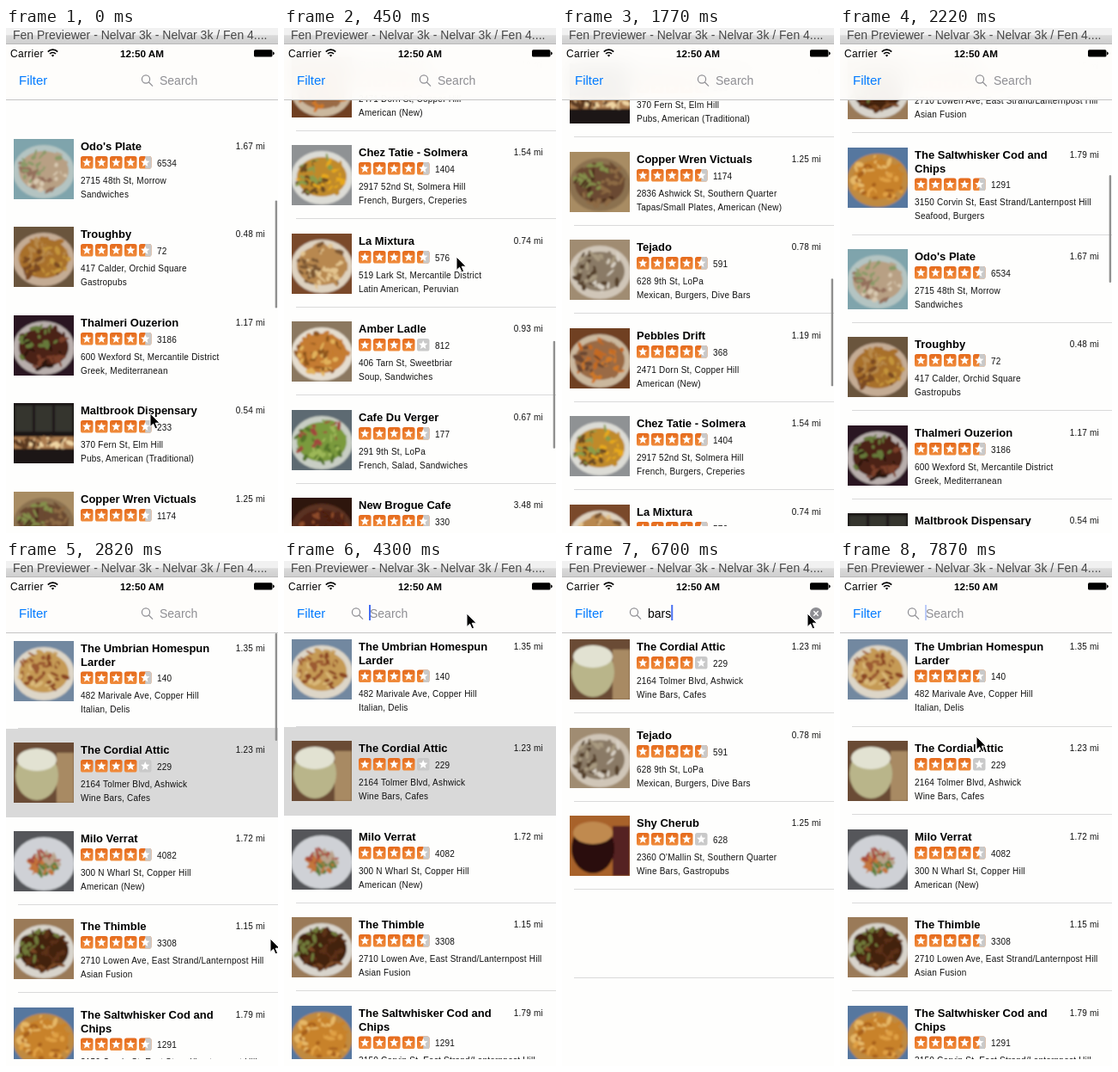
Animation, 317 px wide and 587 px high, one loop 8 s. Source, as an HTML page:

```html
<!DOCTYPE html>
<html lang="en">
<head>
<meta charset="utf-8">
<title>Restaurant list</title>
<style>
html, body { margin: 0; width: 100%; height: 100%; overflow: hidden; background: #fefefd; }
#stage { position: relative; width: 317px; height: 587px; overflow: hidden; }
#stage > svg, #nav { position: absolute; left: 0; top: 0; }
#nav { top: 19px; width: 317px; height: 65px; box-sizing: border-box; border-bottom: 1px solid #c4c4c4;
  background: rgba(254, 253, 251, .95); backdrop-filter: blur(12px); }
text { font-family: "Liberation Sans", Arial, sans-serif; white-space: pre; }
.name { font-size: 13px; font-weight: bold; }
.info { font-size: 10px; letter-spacing: .22px; fill: #111; }
.line { fill: #dadada; }
/* At the start of the flick, hairlines and the rows under the bar are not drawn yet. */
.fast .line, .fast > g:nth-child(-n+5) { display: none; }
</style>
</head>
<body>
<div id="stage">
  <svg width="317" height="579">
    <defs id="defs"></defs>
    <g id="all"></g>
    <g id="found"></g>
    <rect id="bar" x="313.7" width="2.4" height="125" rx="1.2" fill="#8f8f8f"/>
  </svg>
  <div id="nav"></div>
  <svg width="317" height="587">
    <linearGradient id="chrome" x2="0" y2="1">
      <stop offset=".42" stop-color="#f1f1f1"/><stop offset=".46" stop-color="#dadada"/><stop offset="1" stop-color="#cecece"/>
    </linearGradient>
    <rect width="317" height="19" fill="url(#chrome)"/>
    <rect y="18" width="317" height="1" fill="#b9b9b9"/>
    <text x="8" y="12.5" font-size="14" fill="#484848">Fen Previewer - Nelvar 3k - Nelvar 3k / Fen 4....</text>

    <text x="5" y="33.5" font-size="12" letter-spacing=".3">Carrier</text>
    <g fill="none" stroke="#000" stroke-width="1.7">
      <path d="M48.8 27.6a8 8 0 0 1 11.4 0M51 30a5 5 0 0 1 7 0"/>
      <path d="M54.5 33.6l-1.7-1.8a2.4 2.4 0 0 1 3.4 0z" fill="#000" stroke="none"/>
    </g>
    <text x="133" y="33.5" font-size="11.7" font-weight="bold">12:50 AM</text>
    <rect x="289" y="25.3" width="21.5" height="8.2" rx="1.6"/>
    <path d="M311 27.5q1.8 .3 1.8 2t-1.8 2z"/>

    <text x="15" y="66" font-size="15" fill="#007aff">Filter</text>
    <g id="hint">
      <g fill="none" stroke="#8e8e93" stroke-width="1.2">
        <circle cx="84" cy="59.5" r="4.6"/><path d="M87.4 63l4.6 4.6"/>
      </g>
      <text id="query" font-size="14" x="100" y="66"></text>
    </g>
    <rect id="caret" y="51" width="2" height="18" fill="#426bf2"/>
    <g id="clear">
      <circle cx="296" cy="61" r="7" fill="#8e8e93"/>
      <path d="M293.3 58.3l5.4 5.4m0-5.4l-5.4 5.4" stroke="#fff" stroke-width="1.4"/>
    </g>
    <path id="pointer" d="M0 0V15.5L3.6 12.2 6 17.8 8.6 16.7 6.2 11.2H11.2Z" stroke="#fff"/>
  </svg>
</div>
<script>
const $ = id => document.getElementById(id);
const LOOP = 8000, BEAT = 147;

// name, stars, reviews, miles, address, kind, photo (scene and its colours)
const places = [
  ["The Umbrian Homespun|Larder", 4.5, 140, "1.35", "482 Marivale Ave, Copper Hill", "Italian, Delis", "dish #7288a0 #ddd6c8 #c59a55 #8a4522 #d9b878 #9c5a30"],
  ["The Cordial Attic", 4, 229, "1.23", "2164 Tolmer Blvd, Ashwick", "Wine Bars, Cafes", "glass #6b4c34 #b9b58a #e2e2d2 #a88a64"],
  ["Milo Verrat", 4.5, 4082, "1.72", "300 N Wharl St, Copper Hill", "American (New)", "plate #55575a #cfd1d6 #b9a38c #5c7f3c #c4743a #a8483a"],
  ["The Thimble", 4.5, 3308, "1.15", "2710 Lowen Ave, East Strand/Lanternpost Hill", "Asian Fusion", "dish #9a7a58 #d8d4cc #43210f #5c3018 #7b4a26 #6f7a3a"],
  ["The Saltwhisker Cod and|Chips", 4.5, 1291, "1.79", "3150 Corvin St, East Strand/Lanternpost Hill", "Seafood, Burgers", "dish #56779f #c08a40 #c8822a #e0a044 #a8601c #e6b868"],
  ["Odo's Plate", 4.5, 6534, "1.67", "2715 48th St, Morrow", "Sandwiches", "dish #7fa4ac #b4c4c2 #b8a084 #d8c8b0 #94705c #8a9a68"],
  ["Troughby", 4.5, 72, "0.48", "417 Calder, Orchid Square", "Gastropubs", "dish #6a543e #c4ac94 #a8702c #c4943a #7a4a20 #b88a4c"],
  ["Thalmeri Ouzerion", 4.5, 3186, "1.17", "600 Wexford St, Mercantile District", "Greek, Mediterranean", "dish #2c1824 #b8aeac #4b2216 #7a3f2a #2c130e #66793a"],
  ["Maltbrook Dispensary", 4.5, 233, "0.54", "370 Fern St, Elm Hill", "Pubs, American (Traditional)", "taps #1d1713 #34342e #ab7c50 #f0d6a4 #5b3a20"],
  ["Copper Wren Victuals", 4.5, 1174, "1.25", "2836 Ashwick St, Southern Quarter", "Tapas/Small Plates, American (New)", "dish #a88c64 #8b7150 #6a4a30 #8d6a44 #4a2c1a #84904c"],
  ["Tejado", 4.5, 591, "0.78", "628 9th St, LoPa", "Mexican, Burgers, Dive Bars", "dish #a08c72 #d0c6b8 #8a7a66 #d8d0c4 #54402c #a89a80"],
  ["Pebbles Drift", 4.5, 368, "1.19", "2471 Dorn St, Copper Hill", "American (New)", "dish #704020 #cbb89e #9a6a44 #d07828 #6a4730 #c46a24"],
  ["Chez Tatie - Solmera", 4.5, 1404, "1.54", "2917 52nd St, Solmera Hill", "French, Burgers, Creperies", "dish #8f9294 #dcdcd6 #c08a2c #e7a91d #6b4a20 #8a9c48"],
  ["La Mixtura", 4.5, 576, "0.74", "519 Lark St, Mercantile District", "Latin American, Peruvian", "dish #7a4a2c #ded2c0 #b88850 #e3c48f #7b5632"],
  ["Amber Ladle", 4, 812, "0.93", "406 Tarn St, Sweetbriar", "Soup, Sandwiches", "dish #8b7860 #e5ddcf #c57c30 #e2b25b #8e541e"],
  ["Cafe Du Verger", 4.5, 177, "0.67", "291 9th St, LoPa", "French, Salad, Sandwiches", "dish #5d6a72 #c8cec4 #7a9a3c #9db858 #55752a #a04a3c"],
  ["New Brogue Cafe", 4.5, 330, "3.48", "2683 Harrick St, Seagate-Fletchers Point", "Soul Food, American (Traditional)", "dish #2d1710 #5a3220 #4d2012 #74321a #34140b #8d4b2a"],
  ["Mekora Sandwich", 4.5, 2452, "0.39", "740 Merrow St, Sweetbriar", "Vietnamese, Sandwiches", "dish #3c5068 #d8c8b4 #a8927c #dccfbe #76584a #c08c58"],
  ["Dannywilbur", 4, 425, "1.22", "900 Thorpe St, Lower Thorpe", "American (New)", "dish #38453f #c4ccc4 #b0ac62 #8a9048 #d4cc90 #96924e"],
  ["Shy Cherub", 4, 628, "1.25", "2360 O'Mallin St, Southern Quarter", "Wine Bars, Gastropubs", "glass #a8622a #2a0f09 #c08a50 #542024"]
];

function seeded(n) {
  return () => {
    n = n + 0x6d2b79f5 | 0;
    let t = Math.imul(n ^ n >>> 15, 1 | n);
    t = t + Math.imul(t ^ t >>> 7, 61 | t) ^ t;
    return ((t ^ t >>> 14) >>> 0) / 4294967296;
  };
}

const oval = (x, y, rx, ry, fill, turn = 0) =>
  `<ellipse rx="${rx}" ry="${ry}" fill="${fill}" transform="translate(${x} ${y}) rotate(${turn})"/>`;
const box = (x, y, w, h, fill) => `<rect x="${x}" y="${y}" width="${w}" height="${h}" fill="${fill}"/>`;

// Loose morsels; neighbours tend to share a colour.
function heap(rnd, x, y, w, h, tints) {
  return Array.from({ length: 60 }, () => {
    const part = rnd(), a = part * 2 * Math.PI, d = Math.sqrt(rnd());
    const tint = tints[Math.floor(part * tints.length + rnd() * 2) % tints.length];
    return oval((x + Math.cos(a) * d * w).toFixed(1), (y + Math.sin(a) * d * h).toFixed(1),
      (2 + rnd() * 4).toFixed(1), (1 + rnd() * 2).toFixed(1), tint, rnd() * 180 | 0);
  }).join("");
}

const meal = size => (rnd, [plate, ...food]) =>
  oval(35, 38, 36, 31, plate) + oval(35, 37, 29 * size, 23 * size, food[0]) +
  heap(rnd, 35, 37, 30 * size, 25 * size, food);

const scenes = {
  dish: meal(1),
  plate: meal(.55),
  glass: (rnd, [drink, foam, side]) =>
    box(50, 12, 20, 58, side) + oval(27, 38, 25, 29, drink) + oval(27, 20, 23, 13, foam),
  taps: (rnd, [board, ...bar]) =>
    [2, 25, 48].map(x => box(x, 3, 20, 30, board)).join("") + box(0, 39, 70, 14, bar[0]) + heap(rnd, 35, 46, 34, 4, bar)
};

function photo(spec, seed) {
  const [scene, table, ...tints] = spec.split(" ");
  return `<svg x="9" width="70" height="70"><g filter="url(#soft)">
    ${box(-5, -5, 80, 80, table)}${scenes[scene](seeded(seed), tints)}</g></svg>`;
}

const starPoints = Array.from({ length: 10 }, (_, i) => {
  const r = i % 2 ? 2.4 : 5.5, a = i * Math.PI / 5;
  return `${(7.25 + r * Math.sin(a)).toFixed(2)},${(7.5 - r * Math.cos(a)).toFixed(2)}`;
}).join(" ");

const star = (id, fill, extra = "") => `<g id="${id}"><rect width="14.5" height="14.5" rx="2.6" fill="${fill}"/>${extra}
  <polygon points="${starPoints}" fill="#fff"/></g>`;

$("defs").innerHTML = `<filter id="soft" x="0" y="0" width="1" height="1"><feGaussianBlur stdDeviation=".8"/></filter>
  <linearGradient id="glow" x2="0" y2="1"><stop stop-color="#e56a1c"/><stop offset="1" stop-color="#f08c3c"/></linearGradient>` +
  star("none", "#c9c9c9") + star("full", "url(#glow)") +
  star("half", "url(#glow)", `<path d="M7.25 0h4.65q2.6 0 2.6 2.6v9.3q0 2.6-2.6 2.6h-4.65z" fill="#c9c9c9"/>`);

const text = (cls, x, y, s, more = "") => `<text class="${cls}" x="${x}" y="${y}" ${more}>${s}</text>`;
const line = y => `<rect class="line" x="14" y="${y}" width="303" height="1"/>`;

function row(i, y, picked) {
  const [name, rating, count, miles, street, kind, pic] = places[i];
  const lines = name.split("|"), d = (lines.length - 1) * 15.5;
  const stars = [0, 1, 2, 3, 4].map(k =>
    `<use href="#${rating > k + .5 ? "full" : rating > k ? "half" : "none"}" x="${87 + 17 * k}" y="${20 + d}"/>`).join("");
  return `<g transform="translate(0 ${Math.round(y)})">
    ${picked ? box(0, -16, 317, 103, "#d9d9d9") : line(Math.floor(85.5 + d))}
    ${photo(pic, i)}${lines.map((s, k) => text("name", 87, 13 + 15.5 * k, s)).join("")}
    ${text("info", 302, 11.5, miles + " mi", 'text-anchor="end"')}${stars}
    ${text("info", 176, 31.5 + d, count)}${text("info", 87, 51.5 + d, street)}${text("info", 87, 67.5 + d, kind)}</g>`;
}

function list(ids, picked) {
  let y = 91;
  return ids.map(i => {
    const html = row(i, y, i === picked);
    y += places[i][0].includes("|") ? 118 : 102.5;
    return html;
  }).join("");
}

const ids = [...places.keys()];
const rows = { picked: list(ids, 1), plain: list(ids) };
$("found").innerHTML = list(ids.filter(i => /bars/i.test(places[i][5]))) + line(484);

// Poses by beat, joined by slowing moves.
const scroll = [[0, 506], [6, 1584], [8, 1568], [9, 1568], [19, -1.5], [20, 0]];
const pointer = [[0, 168, 448], [6, 218, 171], [9, 226, 190], [11, 330, 520], [17, 330, 520],
  [19, 308, 439], [24, 213, 60], [41, 213, 62], [44, 300, 61], [45, 286, 61], [49, 291, 60], [51, 159, 204]];
const slide = [[26, 79], [28, 0]];
const fade = [[20, 1], [23, 0]];
const typed = [[0, ""], [5200, "b"], [5350, "bar"], [5500, "bars"], [7290, ""]];

function glide(keys, n) {
  const i = keys.findIndex(k => k[0] > n);
  if (i < 1) return keys.at(i).slice(1);
  const a = keys[i - 1], b = keys[i];
  const f = 1 - (1 - (n - a[0]) / (b[0] - a[0])) ** 1.55;
  return a.slice(1).map((v, k) => v + (b[k + 1] - v) * f);
}

const show = (id, on) => $(id).style.display = on ? "" : "none";
const move = (id, x, y) => $(id).setAttribute("transform", `translate(${Math.round(x)} ${Math.round(y)})`);
const set = (id, values) => Object.entries(values).forEach(([k, v]) => $(id).setAttribute(k, v));

function caretOpacity(t, since) {
  if (t < 4300) return 0;
  return t < 5500 ? 1 : .65 + .35 * Math.cos((t - since) / 1200 * 2 * Math.PI);
}

let current;
function draw(t) {
  const beat = Math.floor(t / BEAT);
  const [offset] = glide(scroll, beat);
  const [since, word] = typed.findLast(k => k[0] <= t);
  const filtered = word === "bars";

  const content = t < 5500 ? rows.picked : rows.plain;
  if (content !== current) $("all").innerHTML = current = content;
  move("all", 0, -offset);
  $("all").classList.toggle("fast", beat < 1);
  show("all", !filtered);
  show("found", filtered);
  set("bar", { y: 84 + Math.max(0, offset) * .23, opacity: glide(fade, beat)[0] });

  move("hint", glide(slide, beat)[0], 0);
  $("query").textContent = word || "Search";
  set("query", { fill: word ? "#000" : "#8e8e93" });
  set("caret", {
    x: word ? 100 + $("query").getComputedTextLength() : 99,
    opacity: caretOpacity(t < 5500 ? t : Math.max(since, beat * BEAT), since)
  });
  show("clear", word);
  move("pointer", ...glide(pointer, beat));
  show("pointer", t < 5200 || t >= 6100);
}

const start = performance.now();
function frame() {
  draw((performance.now() - start) % LOOP);
  requestAnimationFrame(frame);
}
frame();
</script>
</body>
</html>
```
